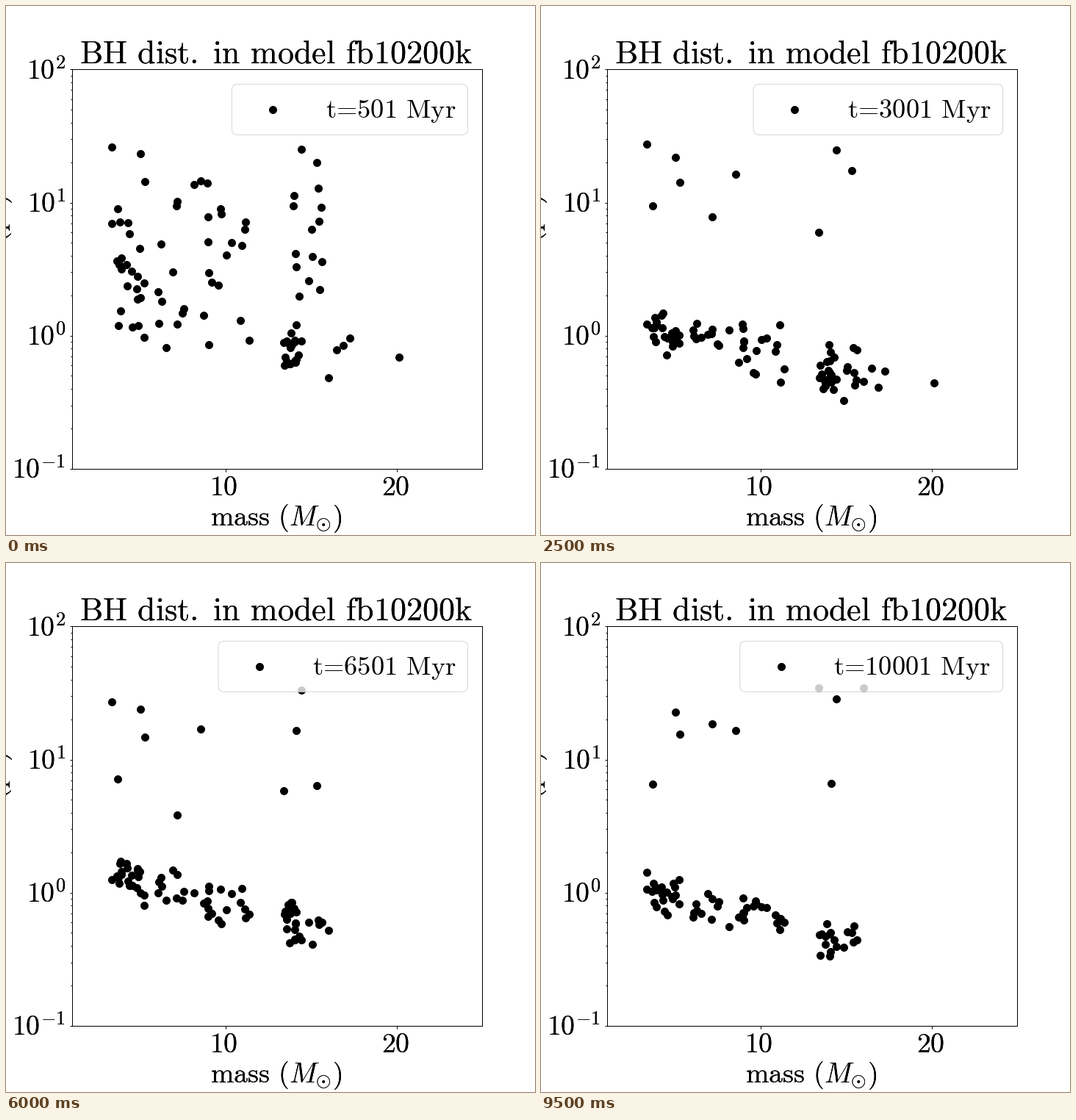
Write a matplotlib script that moves like this. It is 720 px wide and 720 px high and loops after 10000 ms.

```python
import numpy as np
import matplotlib.pyplot as plt
from matplotlib.animation import FuncAnimation
from matplotlib.patches import FancyBboxPatch

plt.rcParams["mathtext.fontset"] = "cm"

FRAMES, INTERVAL = 20, 500
TITLE_SIZE, LABEL_SIZE, LEGEND_SIZE = 44, 37.7, 36.5

# Crowd: count, range of x, range of starting heights on the stage
GROUPS = ((22, (144, 188), (290, 456)),
          (28, (206, 342), (240, 477)),
          (18, (378, 403), (430, 490)),
          (13, (385, 432), (240, 400)),
          (3, (445, 470), (407, 500)))
HEAVY_X, TOP_X, TOP_LIFE = 370, 440, 8

# Stars on wide orbits: x -> heights at the key frames
KEYS = (0, 7, 12, 19)
WIDE = {144: (192, 186, 189, 421), 152: (276, 270, 294, 301),
        183: (201, 208, 199, 203), 189: (239, 240, 237, 233),
        233: (266, 296, 343, 219), 265: (238, 225, 226, 228),
        378: (458, 248, 310, 170), 395: (481, 524, 228, 300),
        402: (195, 196, 173, 185), 423: (213, 228, 303, 503),
        439: (506, 513, 500, 170), 535: (478, 527, 527, 527)}

rng = np.random.default_rng(7)
crowd_x = np.concatenate([rng.uniform(*xs, n) for n, xs, _ in GROUPS])
start_y = np.concatenate([rng.uniform(*ys, n) for n, _, ys in GROUPS])
settle_time = rng.uniform(0.8, 3.5, crowd_x.size)
crowd_life = np.where(crowd_x > HEAVY_X, rng.uniform(6, 32, crowd_x.size), FRAMES)
scatter = 14 * rng.normal(0, 1, (FRAMES, crowd_x.size)).clip(-2, 2)

star_x = np.concatenate([crowd_x, list(WIDE)])
life = np.concatenate([crowd_life, np.full(len(WIDE), FRAMES)])
life[star_x > TOP_X] = TOP_LIFE


def star_heights(frame):
    """The crowd sinks into a slowly swaying band; wide orbits drift."""
    band = np.interp(crowd_x, (150, 300, 400), (440, 475, 503))
    band += 10 * np.cos(np.pi * (frame - 6) / 6) + scatter[frame]
    crowd = band + (start_y - band) * np.exp(-frame / settle_time)
    wide = [np.interp(frame, KEYS, track) for track in WIDE.values()]
    return np.concatenate([crowd, wide])


def roman(text):
    text = text.replace(". ", r".\hspace{0.306}").replace(" ", r"\hspace{0.38}")
    text = text.replace("=", r"\hspace{-0.2}=\hspace{-0.2}")
    return r"\mathrm{" + text + "}"


fig = plt.figure(figsize=(10, 10), dpi=72, facecolor="white")

ax = fig.add_axes([0.125, 0.125, 0.775, 0.755])
ax.set_xlim(1, 25)
ax.set_yscale("log")
ax.set_ylim(0.1, 100)
ax.set_xticks([10, 20])
ax.tick_params(which="both", width=1, labelleft=False, labelbottom=False)
for spine in ax.spines.values():
    spine.set_linewidth(1)

stage = fig.add_axes([0, 0, 1, 1])
stage.set_xlim(0, 720)
stage.set_ylim(720, 0)
stage.axis("off")


def label(x, y, math, size=LABEL_SIZE, ha="center", **style):
    # Two coats give the heavy edges of the fixed lettering
    for _ in range(2):
        stage.text(x, y, f"${math}$", fontsize=size, ha=ha, va="baseline",
                   **style)


label(367.6, 77, roman("BH dist. in model fb10200k"), TITLE_SIZE)
label(367.6, 707, roman("mass (") + r"M_{\odot}" + roman(")"))
label(-0.5, 256, roman("distance (pc)"), ha="right", rotation=90,
      rotation_mode="anchor")
for x, value in ((296.5, 10), (530, 20)):
    label(x, 666, str(value))
for power in range(-1, 3):
    label(81, 462 - 181.2 * power, f"10^{{{power}}}", ha="right")

dot = dict(marker="o", color="black", markersize=10, linestyle="none")
stars, = stage.plot([], [], zorder=2, **dot)
box = FancyBboxPatch((307, 106.4), 321.5, 69, facecolor="white",
                     edgecolor="0.8", alpha=0.8, linewidth=1, zorder=4,
                     boxstyle="round,pad=0,rounding_size=8")
stage.add_patch(box)
key_dot, = stage.plot([], [], zorder=5, **dot)
clock = stage.text(435, 152, "", fontsize=LEGEND_SIZE, va="baseline", zorder=5)


def update(frame):
    alive = frame < life
    stars.set_data(star_x[alive], star_heights(frame)[alive])

    age = str(501 + 500 * frame)
    left = 307.4 - 18.4 * (len(age) - 3)
    box.set_bounds(left, 106.4, 628.5 - left, 69)
    key_dot.set_data([left + 56], [141])
    clock.set_x(left + 127.6)
    clock.set_text(f"${roman(f't={age} Myr')}$")
    return stars, box, key_dot, clock


anim = FuncAnimation(fig, update, frames=FRAMES, interval=INTERVAL, repeat=True)
plt.show()
```
